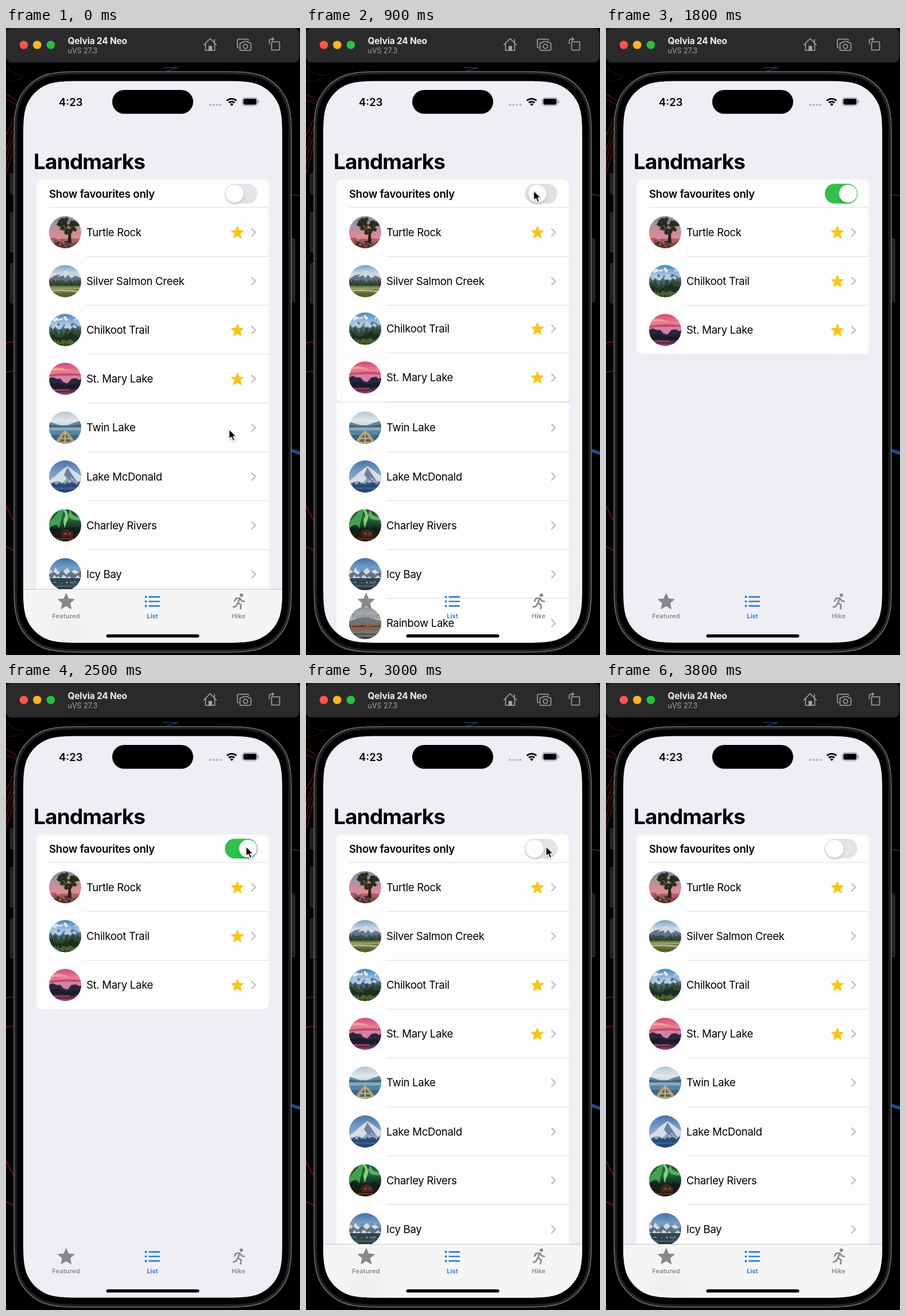
Recreate the animation shown at these times as an HTML page. Size 512x1093 px, loop 3.9 s.

```html
<!DOCTYPE html>
<html lang="en">
<head>
<meta charset="utf-8">
<title>Landmarks list</title>
<style>
  html, body { margin: 0; width: 100%; height: 100%; overflow: hidden; background: #000; }
  svg { display: block; width: 100vw; height: 100vh; font-family: Inter, "Noto Sans", sans-serif; }
  .row-text { font-size: 18.6px; letter-spacing: -.33px; }
  .tab { font-size: 11px; font-weight: 600; text-anchor: middle; letter-spacing: .15px; }
  .slide, .fade, .backdrop, .bar, .knob, .track, .pointer, .pointer-show {
    animation: 3.9s linear infinite;
  }
  .slide { animation-name: slide; }
  .fade { animation-name: fade; }
  .backdrop, .bar { animation-name: backdrop; animation-timing-function: step-end; }
  .bar { animation-name: bar; }
  .knob { animation-name: knob; }
  .track { animation-name: track; }
  .pointer { animation-name: pointer; }
  .pointer-show { animation-name: pointer-show; animation-timing-function: step-end; }

  @keyframes slide {
    0%, 74.87%, 100% { transform: translateY(0); }
    22.26% { transform: translateY(0); animation-timing-function: ease-in-out; }
    29.44% { transform: translateY(-85.15px); }
    67.69% { transform: translateY(-85.15px); animation-timing-function: ease-in-out; }
  }
  @keyframes fade {
    0%, 74.87%, 100% { opacity: 1; }
    23.08% { opacity: 1; animation-timing-function: ease-in-out; }
    29.44% { opacity: 0; }
    67.69% { opacity: 0; animation-timing-function: ease-in-out; }
  }
  @keyframes backdrop { 0% { opacity: 1; } 22.26% { opacity: 0; } 74.87%, 100% { opacity: 1; } }
  @keyframes bar { 0% { opacity: 1; } 22.26% { opacity: 0; } 70%, 100% { opacity: 1; } }
  @keyframes knob {
    0%, 74%, 100% { transform: translateX(0); }
    21.3% { transform: translateX(0); animation-timing-function: ease-in-out; }
    26.9% { transform: translateX(23.5px); }
    67% { transform: translateX(23.5px); animation-timing-function: ease-in-out; }
  }
  @keyframes track {
    0%, 22.9%, 75%, 100% { fill: #e3e3e8; }
    29.8%, 67% { fill: #31bf4d; }
  }
  @keyframes pointer {
    0% { transform: translate(388.5px, 699.5px); }
    7.7% { transform: translate(388.5px, 699.5px); animation-timing-function: ease-in-out; }
    19.2%, 39.7% { transform: translate(396.5px, 283.5px); }
    57.7%, 100% { transform: translate(418px, 285px); }
  }
  @keyframes pointer-show {
    0% { opacity: 1; } 39.7% { opacity: 0; } 58.9% { opacity: 1; } 88.5%, 100% { opacity: 0; }
  }
</style>
</head>
<body>
<svg viewBox="0 0 512 1093" preserveAspectRatio="none">
  <defs>
    <clipPath id="screen"><path id="display"/></clipPath>
    <clipPath id="round"><circle r="28"/></clipPath>
    <filter id="soft" x="-30%" y="-30%" width="160%" height="170%">
      <feDropShadow dx="0" dy="2" stdDeviation="2" flood-opacity=".22"/>
    </filter>
    <filter id="blur" x="-50%" y="-50%" width="200%" height="200%"><feGaussianBlur stdDeviation="14"/></filter>
    <path id="star" d="M0-10.6L2.9-3.6 10.4-3 4.7 1.9 6.5 9.3 0 5.3-6.5 9.3-4.7 1.9-10.4-3-2.9-3.6Z" stroke-width="1.3" stroke-linejoin="round"/>
  </defs>

  <rect width="512" height="1093"/>
  <g id="wallpaper" fill="none" stroke="#571310" stroke-width="1.6">
    <path d="M0 116Q10 118 19 129M0 126Q10 128 19 134M0 186Q12 168 18 142M0 214Q10 180 18 160M0 240Q6 200 16 186M0 254Q9 225 15 196"/>
    <path d="M0 66Q15 86 36 82M0 92Q14 96 30 86" stroke="#25080a"/>
    <path d="M0 549Q8 547 16 548M0 600Q8 598 16 599M0 833Q8 850 16 862M0 905Q7 906 15 912" stroke-width="2.4"/>
    <path d="M274 69H300L280 75M496 291Q505 290 512 293" stroke="#142b54" stroke-width="2"/>
    <path d="M496 736L514 742" stroke="#24488a" stroke-width="6"/>
  </g>

  <g fill="#202020" stroke="#393939">
    <rect x="7.5" y="253.5" width="9" height="36" rx="2"/>
    <rect x="7.5" y="321.5" width="9" height="69" rx="2"/>
    <rect x="7.5" y="410.5" width="9" height="69" rx="2"/>
    <rect x="494" y="367.5" width="9" height="110" rx="2"/>
  </g>
  <path id="case" fill="#222" stroke="#6a6a6a" stroke-width="1.6"/>
  <path id="bezel" stroke="#0b0b0b"/>

  <g clip-path="url(#screen)">
    <rect x="30" y="92" width="451" height="980" fill="#efeef4"/>
    <text x="48" y="246" font-size="37" font-weight="700" letter-spacing="-.85">Landmarks</text>
    <path class="backdrop" d="M53 1080V274a10 10 0 0 1 10-10H448a10 10 0 0 1 10 10V1080Z" fill="#fdfdfd"/>
    <g id="list"></g>
    <path d="M53 313V274a10 10 0 0 1 10-10H448a10 10 0 0 1 10 10V313Z" fill="#fdfdfd"/>
    <path d="M75 313H458" stroke="#dedee0" stroke-width="1.2"/>
    <text class="row-text" x="75" y="295.5" font-weight="600" style="letter-spacing:-.23px">Show favourites only</text>
    <rect class="track" x="381" y="271.5" width="57" height="34.5" rx="17.25"/>
    <circle class="knob" cx="398" cy="288.8" r="15.6" fill="#fdfdfd" filter="url(#soft)"/>

    <g class="bar">
      <rect x="30" y="978" width="451" height="94" fill="#f5f5f6"/>
      <ellipse cx="105" cy="1050" rx="30" ry="20" fill="#c9c9c6" opacity=".2" filter="url(#blur)"/>
      <path d="M30 978.5H481" stroke="#c6c6ca"/>
    </g>
    <g fill="#87878c">
      <use href="#star" transform="translate(104.8 1000) scale(1.3)" stroke="#87878c"/>
      <text class="tab" x="104.5" y="1029">Featured</text>
      <text class="tab" x="405" y="1029">Hike</text>
      <circle cx="410" cy="988.7" r="3"/>
      <path d="M407 994L404 1002 409.5 1006 408.5 1012.5M403 1003L400.5 1008 396 1009.5M407 994L401 994 398 999M408 995L411 999 415 999.5" fill="none" stroke="#87878c" stroke-width="2.7" stroke-linecap="round" stroke-linejoin="round"/>
    </g>
    <g fill="#1774d3">
      <circle cx="243.6" cy="991.7" r="1.9"/><circle cx="243.6" cy="999.6" r="1.9"/><circle cx="243.6" cy="1007.5" r="1.9"/>
      <path d="M249.5 991.7H267M249.5 999.6H267M249.5 1007.5H267" stroke="#1774d3" stroke-width="2.4" stroke-linecap="round"/>
      <text class="tab" x="255" y="1029">List</text>
    </g>
    <rect x="174.5" y="1057" width="162" height="5.6" rx="2.8"/>

    <text x="92" y="135.5" font-size="18.5" font-weight="600">4:23</text>
    <rect x="185" y="108" width="141" height="41.5" rx="20.75"/>
    <path d="M355.5 134H375" stroke="#b7b7bc" stroke-width="4.2" stroke-linecap="round" stroke-dasharray="0 6"/>
    <g fill="none" stroke="#000" stroke-width="2.8">
      <path d="M384.7 126.6A12.2 12.2 0 0 1 401.3 126.6M388 130.4A7.4 7.4 0 0 1 398 130.4"/>
      <path d="M390 132.8A4.5 4.5 0 0 1 396 132.8L393 136Z" fill="#000" stroke="none"/>
      <rect x="411.5" y="121.5" width="26.5" height="14" rx="4.5" stroke="#8e8e93" stroke-width="1.2"/>
      <path d="M440 126.5v4" stroke="#8e8e93" stroke-width="1.6"/>
    </g>
    <rect x="413.3" y="123.3" width="23" height="10.4" rx="2.9"/>
  </g>

  <rect width="511" height="60" rx="9" fill="#2a2a2a"/>
  <circle cx="31" cy="29.5" r="7.3" fill="#ff544d"/>
  <circle cx="54.3" cy="29.5" r="7.3" fill="#fdb528"/>
  <circle cx="78" cy="29.5" r="7.3" fill="#2bc044"/>
  <text x="107.5" y="27.5" font-size="15.5" font-weight="700" letter-spacing="-.2" fill="#f0f0f0">Qelvia 24 Neo</text>
  <text x="107.5" y="44" font-size="12.5" fill="#a3a3a3">uVS 27.3</text>
  <g fill="none" stroke="#a6a6a6" stroke-width="1.6" stroke-linejoin="round" stroke-linecap="round">
    <path d="M344.5 29.5L355.5 18.5 366.5 29.5M347.5 27V39H363.5V27M363 25V20"/>
    <rect x="353.5" y="32" width="4.5" height="7" fill="#a6a6a6"/>
    <path d="M405 34.5a2 2 0 0 1-2-2V21.5a2 2 0 0 1 2-2H420.5a2 2 0 0 1 2 2"/>
    <path d="M409.5 25.5H412L413.5 23.5H420.5L422 25.5H424.5a2 2 0 0 1 2 2V37a2 2 0 0 1-2 2H409.5a2 2 0 0 1-2-2V27.5a2 2 0 0 1 2-2Z"/>
    <circle cx="417" cy="32" r="3.8"/>
    <rect x="462.5" y="24" width="14" height="14.5" rx="1.8"/>
    <path d="M458.5 27.5V22.5Q458.5 19.5 461.5 19.5H466M463.5 17L466.5 19.5 463.5 22"/>
  </g>

  <g class="pointer-show"><path class="pointer" d="M0 0V17L4 13.4 6.7 20 9.8 18.6 7 12.3H12.3Z" stroke="#fff" stroke-width="1.3" stroke-linejoin="round" filter="url(#soft)"/></g>
</svg>

<script>
const PITCH = 85.15, FIRST = 313;

// Rounded rectangle whose corners ease into the straight sides
function smoothRect(x, y, w, h, r) {
  const steps = [[0, 1.529], [0, 1.088], [0, .868], [.075, .631], [.169, .373], [.373, .169],
    [.631, .075], [.868, 0], [1.088, 0], [1.529, 0]];
  const corner = (flipX, flipY) => {
    const points = steps.map(([a, b]) => [flipX ? x + w - a * r : x + a * r, flipY ? y + h - b * r : y + b * r]);
    if (flipX !== flipY) points.reverse();
    return `${points[0]}C${points.slice(1).join(' ')}`;
  };
  return `M${corner(false, false)}L${corner(true, false)}L${corner(true, true)}L${corner(false, true)}Z`;
}

const setPath = (id, d) => document.getElementById(id).setAttribute('d', d);
setPath('case', smoothRect(14, 76, 483, 1012, 85));
setPath('bezel', smoothRect(19, 81, 473, 1002, 80));
setPath('display', smoothRect(30, 92.5, 451, 979, 69.4));

function random(seed) {
  let s = seed * 7919 + 17;
  return () => (s = (s * 16807) % 2147483647) / 2147483647;
}

// Jagged silhouette filling everything below it
function ridge(seed, y, height, steps = 10) {
  const rnd = random(seed);
  rnd();
  let d = 'M-30 30';
  for (let i = 0; i <= steps; i++) {
    d += `L${(-30 + 60 * i / steps).toFixed(1)} ${(y - height * rnd()).toFixed(1)}`;
  }
  return d + 'L30 30Z';
}

const band = (y, h) => `M-30 ${y}H30V${y + h}H-30Z`;

function tufts(seed, count, x, y, w, h, r) {
  const rnd = random(seed);
  let d = '';
  for (let i = 0; i < count; i++) {
    const a = rnd() * 6.28, q = Math.sqrt(rnd()), s = r * (.6 + .6 * rnd());
    const cx = x + Math.cos(a) * q * w, cy = y + Math.sin(a) * q * h;
    d += `M${(cx - s).toFixed(1)} ${cy.toFixed(1)}a${s} ${s} 0 1 0 ${2 * s} 0a${s} ${s} 0 1 0 ${-2 * s} 0`;
  }
  return d;
}

// Each scene: sky colours from top to bottom, then painted layers
const scenes = [
  { sky: ['#77889b', '#a8949f', '#dd8a95'], layers: [
    ['#a95f68', ridge(3, 13, 4)], ['#7b4740', ridge(5, 20, 8, 14)],
    ['#45302a', tufts(8, 18, 0, 23, 27, 5, 3)], ['#946055', tufts(4, 9, -10, 19, 15, 4, 2)],
    ['#2b221c', 'M4 19L6 3-4-6-2-8 7-1 14-11 17-9 10 3 11 19Z'],
    ['#2b2a1c', tufts(9, 34, 6, -11, 19, 12, 3.4)], ['#514630', tufts(12, 20, 6, -11, 18, 11, 1.4)]] },
  { sky: ['#6a9bc2', '#d2dde6', '#cfd9df'], layers: [
    ['#637585', 'M-30-2L-18-10-8-12 1-20 11-13 30-4V30H-30Z'],
    ['#d0d8df', 'M1-20L-8-12-13-7-3-10 0-5 5-11 10-5 18-9 11-13Z'],
    ['#3b4c45', ridge(2, 2, 6, 30)], ['#25362a', ridge(6, 8, 5, 30)],
    ['#6d7a3d', band(8, 22)], ['#97a457', band(11, 3)], ['#b3bcae', 'M-30 16Q0 13 30 18V20Q0 16-30 18Z'],
    ['#56652f', band(21, 9)]] },
  { sky: ['#3f7bb8', '#9dc0dc', '#c9dbe6'], layers: [
    ['#e2eaf0', tufts(3, 9, -2, -20, 25, 4, 2.5)], ['#52759a', ridge(7, -4, 9)],
    ['#b9cbd9', ridge(7, -4, 9, 13) + band(-4, 3)], ['#44667e', ridge(8, 0, 6, 14)],
    ['#31472f', ridge(9, 9, 12, 29)], ['#1e2f20', ridge(5, 15, 12, 25)],
    ['#4a6230', ridge(4, 23, 7, 24)], ['#2a3f20', ridge(2, 28, 6, 22)]] },
  { sky: ['#cf4a73', '#ea7890', '#cc85a8'], layers: [
    ['#f19d9d', 'M-30-17Q-10-22 2-16T30-19V-16Q14-12 0-14T-30-12Z'],
    ['#b84e78', 'M-30-6Q-7-12 30-8V-5Q-8-7-30-3Z'],
    ['#2b2640', 'M-30 1L-22-3-15 0-8 0-3 6 4 8 11 0 19-1 24 2 30 0V17H-30Z'],
    ['#1e1a2c', 'M-30 9L-12 7 3 11 30 8V19H-30Z'],
    ['#8e4267', band(18, 12)], ['#52284a', 'M-30 21H30L12 24H-30Z'], ['#241829', 'M8 18Q15 17 20 20H7Z']] },
  { sky: ['#a9c4d6', '#e3e7e7', '#b3c4cb'], layers: [
    ['#66849a', 'M-30-11L-18-7-8-4 4-4 14-8 30-13V5H-30Z'], ['#3f5f75', 'M-30-5L-13-3 10-3 30-6V2H-30Z'],
    ['#5784a4', band(-1, 31)], ['#86abbf', band(0, 5)], ['#3a6684', band(13, 17)],
    ['#b9a06f', 'M0 5Q14 16 19 30H-19Q-12 14 0 5Z'], ['#50665f', 'M0 10Q9 18 12 30H-12Q-8 18 0 10Z'],
    ['#d1b88a', 'M-8 18H8V20H-8ZM-11 25H11V27H-11ZM-1 5H1V30H-1Z']] },
  { sky: ['#4a70a6', '#6f94c2', '#93aecb'], layers: [
    ['#8a9fba', 'M-30 6L-16-3 4-18 14-11 30 1V30H-30Z'],
    ['#d5dde7', 'M4-18L-8-9-18 0-30 9V13L-14 8-4 11 4 2 9 10 14 3 22 9 30 6V1L14-11Z'],
    ['#6c82a0', 'M4-16L9-8 20 8 10 2 13 10 4 4-2-3Z'],
    ['#344d70', ridge(8, 15, 6, 18)], ['#294876', band(15, 15)], ['#3d6090', band(19, 3)]] },
  { sky: ['#1d4a2c', '#2b6b3c', '#14291f'], layers: [
    ['#43a050', 'M-28-6Q-15-16-9-30H-1Q-7-14-10 6-15-8-28 6Z'],
    ['#85d17c', 'M-1-30Q8-17 4-9T0 6Q-5-8-1-14T-7-30Z'],
    ['#58b060', 'M10-30Q8-16 24-14L30-8Q20-9 14-10T5-18Z'],
    ['#0f2018', ridge(4, 12, 10, 20)], ['#241914', band(14, 16)],
    ['#4b271d', 'M-7 12L2 6 13 12V20H-6Z'], ['#b4582c', 'M-1 13h3v3h-3ZM7 13h2v3H7Z'], ['#513223', band(22, 3)]] },
  { sky: ['#3a6da6', '#6f9dc6', '#a3bfd2'], layers: [
    ['#7c92a9', ridge(3, -5, 10)], ['#d3dbe2', ridge(6, -2, 10, 14)],
    ['#607487', 'M-30 1L-20-4-13 1-5-6 2 1 10-5 17 0 30-5V9H-30Z'],
    ['#cbd6dc', ridge(7, 8, 7, 16)], ['#31454f', band(7, 23)],
    ['#9fb1b9', tufts(2, 12, 0, 15, 27, 3, 1.3)], ['#4a6672', band(20, 2)], ['#1c313b', band(24, 6)]] },
  { sky: ['#8492a0', '#b3aeaa', '#cfae97'], layers: [
    ['#6d757e', 'M-30-2L-14-8 2-11 14-7 30-3V10H-30Z'], ['#8f6147', ridge(6, 4, 6, 18)],
    ['#3a3832', ridge(3, 7, 4, 30)], ['#74777b', band(7, 23)],
    ['#8f6049', 'M-30 8H30V11L14 14 0 12-15 15-30 12Z'], ['#4f5051', band(18, 3)], ['#394349', band(24, 6)]] },
];

const names = ['Turtle Rock', 'Silver Salmon Creek', 'Chilkoot Trail', 'St. Mary Lake', 'Twin Lake',
  'Lake McDonald', 'Charley Rivers', 'Icy Bay', 'Rainbow Lake'];
const favourites = [0, 2, 3];

function thumbnail({ sky, layers }, i) {
  const stops = sky.map((c, k) => `<stop offset="${k * .3}" stop-color="${c}"/>`).join('');
  const shapes = layers.map(([fill, d]) => `<path d="${d}" fill="${fill}"/>`).join('');
  return `<linearGradient id="sky${i}" x2="0" y2="1">${stops}</linearGradient>
    <g transform="translate(103 43)" clip-path="url(#round)">
      <rect x="-30" y="-30" width="60" height="60" fill="url(#sky${i})"/>${shapes}</g>`;
}

function row(i) {
  const liked = favourites.includes(i), last = i === 3;
  const motion = i === 0 ? '' : liked ? 'slide' : 'fade';
  const panel = last
    ? 'M53 0H458V75.3a10 10 0 0 1-10 10H63a10 10 0 0 1-10-10Z'
    : 'M53 0H458V85.3H53Z';
  const star = liked ? '<use href="#star" x="403" y="43.6" fill="#f7c51c" stroke="#f7c51c"/>' : '';
  return `<g transform="translate(0 ${FIRST + i * PITCH})"><g class="${motion}">
    <path d="${panel}" fill="#fdfdfd"/>${thumbnail(scenes[i], i)}
    <text class="row-text" x="140" y="49.8">${names[i]}</text>${star}
    <path d="M428 37L434.3 43.2 428 49.4" fill="none" stroke="#b9b9bd" stroke-width="2.1" stroke-linecap="round" stroke-linejoin="round"/>
    <path class="${last ? 'fade' : ''}" d="M140 85.3H458" stroke="#dedee0" stroke-width="1.2"/></g></g>`;
}

// Fading rows are painted over the ones that slide beneath them
const order = [8, 7, 6, 5, 4, 3, 2, 1, 0];
document.getElementById('list').innerHTML = order.map(row).join('');
</script>
</body>
</html>
```
